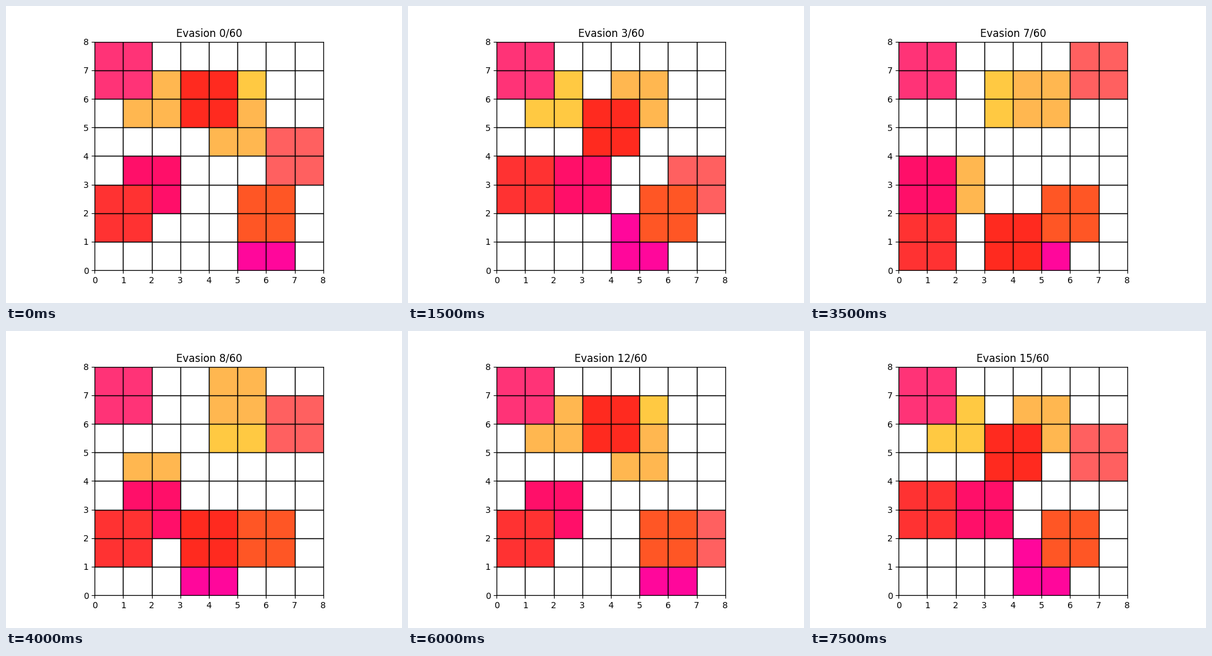
Write a matplotlib script that moves like this. It is 640x480 px and loops after 8000 ms.

```python
import matplotlib.pyplot as plt
import numpy as np
from matplotlib.animation import FuncAnimation
from matplotlib.collections import PolyCollection
from matplotlib.colors import to_rgb

plt.rcParams["text.kerning_factor"] = 6

SIZE = 8
STEPS = 60
FRAMES = 16

# Bottom to top: colour, x, y, axis of travel, length of travel, step at the low end
BLOCKS = [
    ("#ffc942", 0, 5, "x", 6, 4),
    ("#ffb750", 1, 0, "y", 6, 5),
    ("#ffb750", 4, 3, "y", 3, 5),
    ("#ff079b", 3, 0, "x", 3, 2),
    ("#ff6060", 6, 1, "y", 5, 2),
    ("#ff0f69", 0, 2, "x", 3, 1),
    ("#ff3232", 0, 0, "y", 3, 1),
    ("#ff2a1f", 3, 0, "y", 6, 7),
    ("#ff5625", 5, 1, "x", 0, 0),
    ("#ff3377", 0, 6, "x", 0, 0),
]


def bounce(step, length):
    """Walk back and forth between 0 and length, one cell per step."""
    if length == 0:
        return 0
    return length - abs(step % (2 * length) - length)


def board(step):
    """Cell colours, row by row from the bottom."""
    cells = np.ones((SIZE, SIZE, 3))
    for color, x, y, axis, length, start in BLOCKS:
        shift = bounce(step - start, length)
        if axis == "x":
            x += shift
        else:
            y += shift
        cells[y:y + 2, x:x + 2] = to_rgb(color)
    return cells.reshape(-1, 3)


def square(x, y):
    return [(x, y), (x, y + 1), (x + 1, y + 1), (x + 1, y)]


fig, ax = plt.subplots(figsize=(6.4, 4.8), dpi=100)
ax.set_aspect("equal")
ticks = range(SIZE + 1)
ax.set(xlim=(0, SIZE), ylim=(0, SIZE), xticks=ticks, yticks=ticks)
squares = [square(x, y) for y in range(SIZE) for x in range(SIZE)]
grid = PolyCollection(squares, facecolors=board(0), edgecolors="k", linewidths=1)
ax.add_collection(grid)
title = ax.set_title(f"Evasion 0/{STEPS}")


def update(step):
    grid.set_facecolor(board(step))
    title.set_text(f"Evasion {step}/{STEPS}")
    return grid, title


anim = FuncAnimation(fig, update, frames=FRAMES, interval=500,
                     repeat=True, repeat_delay=0)
plt.show()
```
